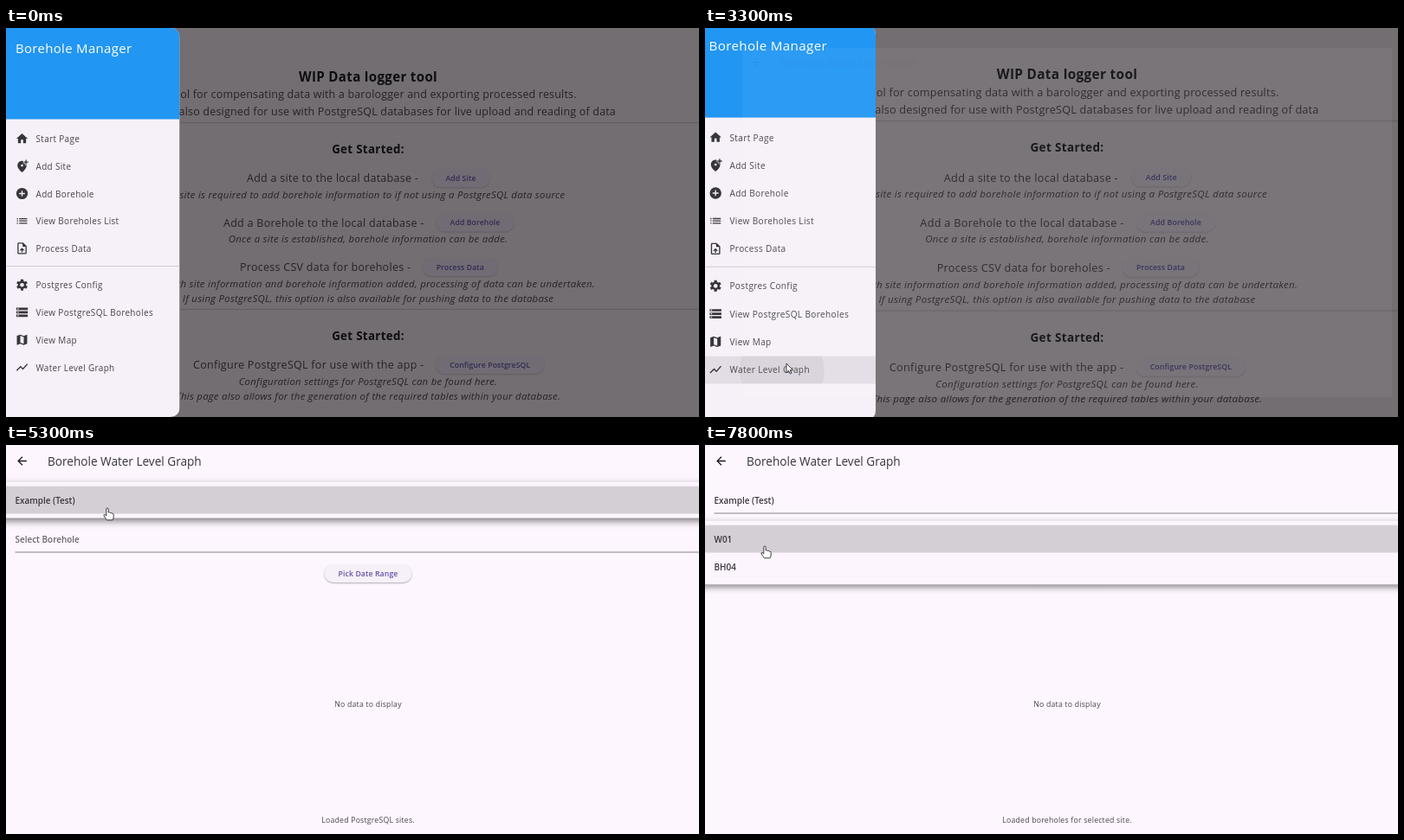
Animation, 800 px wide and 450 px high, one loop 8 s. Source, as an HTML page with a canvas:

```html
<!DOCTYPE html>
<html lang="en">
<head>
<meta charset="utf-8">
<title>Borehole Manager</title>
<style>
html, body { margin: 0; width: 100%; height: 100%; overflow: hidden; }
canvas { display: block; }
</style>
</head>
<body>
<canvas id="stage" width="800" height="450"></canvas>
<script>
const ctx = document.getElementById('stage').getContext('2d');
const LOOP = 8000, STEP = 100;
const PAGE_W = 836, CX = 418, CY = 225, DRAWER_W = 200.5, DP = 0.6614;
const FONT = '"Open Sans", "Noto Sans", sans-serif';
const SURFACE = '#fdf6fe', INK = '#38353b', PURPLE = '#6750a4';

// Text styles: font prefix, size, letter spacing
const TITLE = ['', 13.6, 0];
const HEADER = ['', 14.95, 0.33];
const ITEM = ['', 9.93, 0.35];
const FIELD = ['600 ', 9.93, 0];
const BODY = ['', 8.7, 0.23];
const BUTTON = ['600 ', 8.7, 0.1];
const HEADLINE = ['bold ', 15.1, 0.33];
const SUBHEAD = ['bold ', 13.3, 0.33];
const INTRO = ['', 12.5, 0.18];
const ROW = ['', 12.5, 0.27];
const NOTE = ['italic ', 11.35, 0.3];

const ICONS = {
  back: 'M20 11H7.83l5.59-5.59L12 4l-8 8 8 8 1.41-1.41L7.83 13H20v-2z',
  home: 'M10 20v-6h4v6h5v-8h3L12 3 2 12h3v8z',
  pin: 'M20 1v3h3v2h-3v3h-2V6h-3V4h3V1h2zm-8 12c1.1 0 2-.9 2-2s-.9-2-2-2-2 .9-2 2 .9 2 2 2zm2-9.75V7h3v3h2.92c.05.39.08.79.08 1.2 0 3.32-2.67 7.25-8 11.8-5.33-4.55-8-8.48-8-11.8C4 6.22 7.8 3 12 3c.68 0 1.35.08 2 .25z',
  add: 'M12 2a10 10 0 1 0 0 20 10 10 0 0 0 0-20zm5 11h-4v4h-2v-4H7v-2h4V7h2v4h4z',
  list: 'M3 7h2v2H3zm0 4h2v2H3zm0 4h2v2H3zM7 7h14v2H7zm0 4h14v2H7zm0 4h14v2H7z',
  file: 'M14 2H6q-2 0-2 2v16q0 2 2 2h12q2 0 2-2V8zm4 18H6V4h7v5h5zM8 15l1.4 1.4 1.6-1.6V19h2v-4.2l1.6 1.6L16 15l-4-4z',
  storage: 'M2 20h20v-4H2zm2-3h2v2H4zM2 4v4h20V4zm4 3H4V5h2zm-4 7h20v-4H2zm2-3h2v2H4z',
  map: 'M20.5 3L15 5.1 9 3 3 5v16l6-2.1 6 2.1 6-2V3zM15 19l-6-2.1V5l6 2.1z',
  chart: 'M3.5 18.5l6-6 4 4L22 6.9l-1.4-1.4-7.1 8-4-4L2 17z'
};
for (const name in ICONS) ICONS[name] = new Path2D(ICONS[name]);

const ARROW = new Path2D('M0 0V10.6L2.5 8.4 4.2 12 5.8 11.3 4.2 7.8H7.5z');
const HAND = new Path2D('M-1.2 1.2a1.2 1.2 0 0 1 2.4 0V5q1.6-.6 2 .5 1.5-.5 2 .6 1.9-.3 2 1.2V10q0 2-1.2 3.8H-.6Q-2 12-4 8.8q-.3-1.6 1.2-1.3L-1.2 9z');

const MENU = [
  ['home', 'Start Page', 128.5], ['pin', 'Add Site', 160.2], ['add', 'Add Borehole', 192],
  ['list', 'View Boreholes List', 223.7], ['file', 'Process Data', 255.4],
  ['gear', 'Postgres Config', 297.7], ['storage', 'View PostgreSQL Boreholes', 329.4],
  ['map', 'View Map', 361.2], ['chart', 'Water Level Graph', 393]
];

// Pointer path: time, x, y
const PATH = [
  [1800, 528, -5], [1900, 562, 25], [2000, 589, 80], [2100, 583, 150], [2200, 535, 220],
  [2300, 440, 282], [2400, 325, 332], [2500, 225, 364], [2600, 147, 379], [2700, 94, 388],
  [3600, 94, 388], [3900, 112, 320], [4100, 150, 220], [4400, 180, 120], [4600, 176, 68],
  [4900, 176, 68], [5300, 117, 73], [5400, 103, 67], [5700, 103, 67], [6000, 83, 100],
  [6300, 72, 113], [6500, 69, 117]
];

const ramp = (t, from, to) => Math.min(1, Math.max(0, (t - from) / (to - from)));

function pointerAt(t) {
  const next = PATH.findIndex(p => p[0] > t);
  if (next < 0) return PATH[PATH.length - 1].slice(1);
  const [a, b] = [PATH[next - 1], PATH[next]], k = ramp(t, a[0], b[0]);
  return [a[1] + (b[1] - a[1]) * k, a[2] + (b[2] - a[2]) * k];
}

// cubic-bezier(.4, 0, .2, 1)
function fastOutSlowIn(x) {
  let lo = 0, hi = 1;
  for (let i = 0; i < 20; i++) {
    const u = (lo + hi) / 2, v = 1 - u;
    if (1.2 * v * v * u + 0.6 * v * u * u + u * u * u < x) lo = u; else hi = u;
  }
  return lo * lo * (3 - 2 * lo);
}

function rect(x, y, w, h, color) {
  ctx.fillStyle = color;
  ctx.fillRect(x, y, w, h);
}

// y is the middle of the capitals
function text(str, x, y, [prefix, size, spacing], color, align = 'left') {
  ctx.font = `${prefix}${size}px ${FONT}`;
  ctx.letterSpacing = spacing + 'px';
  ctx.textAlign = align;
  ctx.fillStyle = color;
  ctx.fillText(str, x, y + size * 0.357);
}

function zoomed(scale, draw) {
  ctx.save();
  ctx.translate(CX, CY);
  ctx.scale(scale, scale);
  ctx.translate(-CX, -CY);
  draw();
  ctx.restore();
}

function gear() {
  ctx.lineWidth = 3.8;
  ctx.beginPath();
  ctx.arc(0, 0, 5.4, 0, 2 * Math.PI);
  ctx.stroke();
  ctx.lineWidth = 4.6;
  for (let i = 0; i < 6; i++) {
    const a = Math.PI * (i / 3 + 1 / 6), c = Math.cos(a), s = Math.sin(a);
    ctx.beginPath();
    ctx.moveTo(6 * c, 6 * s);
    ctx.lineTo(9.8 * c, 9.8 * s);
    ctx.stroke();
  }
}

function icon(name, x, y, color) {
  ctx.save();
  ctx.translate(x, y);
  ctx.scale(DP, DP);
  ctx.fillStyle = ctx.strokeStyle = color;
  if (name === 'gear') gear();
  else {
    ctx.translate(-12, -12);
    ctx.fill(ICONS[name], 'evenodd');
  }
  ctx.restore();
}

function pill(label, x, y, fill, color, shadow) {
  ctx.font = `${BUTTON[0]}${BUTTON[1]}px ${FONT}`;
  ctx.letterSpacing = BUTTON[2] + 'px';
  const w = ctx.measureText(label).width + 32;
  ctx.save();
  ctx.shadowColor = shadow;
  ctx.shadowBlur = 2;
  ctx.shadowOffsetY = 1;
  ctx.fillStyle = fill;
  ctx.beginPath();
  ctx.roundRect(x - w / 2, y - 10.5, w, 21, 10.5);
  ctx.fill();
  ctx.restore();
  text(label, x, y, BUTTON, color, 'center');
}

function home() {
  const strong = '#0e0d0f', ink = '#252226';
  const centered = (str, y, style, color = ink) => text(str, CX, y, style, color, 'center');
  const action = (str, x, y, label, buttonX) => {
    text(str, x, y, ROW, ink);
    pill(label, buttonX, y - 0.5, '#716c73', '#322a54', 'rgba(0,0,0,.16)');
  };
  rect(-50, -50, 950, 550, '#736e72');
  centered('WIP Data logger tool', 56.5, HEADLINE, strong);
  centered('A tool for compensating data with a barologger and exporting processed results.', 77, INTRO);
  centered('This tool is also designed for use with PostgreSQL databases for live upload and reading of data', 96.5, INTRO);
  rect(0, 109, PAGE_W, 1, '#615c61');
  centered('Get Started:', 140, SUBHEAD, strong);
  action('Add a site to the local database -', 278, 174, 'Add Site', 525);
  centered('A site is required to add borehole information to if not using a PostgreSQL data source', 192.5, NOTE);
  action('Add a Borehole to the local database -', 251, 225.5, 'Add Borehole', 541.5);
  centered('Once a site is established, borehole information can be adde.', 244, NOTE);
  action('Process CSV data for boreholes -', 270, 277, 'Process Data', 524.3);
  centered('Once with site information and borehole information added, processing of data can be undertaken.', 295.5, NOTE);
  centered('If using PostgreSQL, this option is also available for pushing data to the database', 312.5, NOTE);
  rect(0, 325, PAGE_W, 1, '#615c61');
  centered('Get Started:', 356, SUBHEAD, strong);
  action('Configure PostgreSQL for use with the app -', 216, 390, 'Configure PostgreSQL', 558.7);
  centered('Configuration settings for PostgreSQL can be found here.', 408.5, NOTE);
  centered('This page also allows for the generation of the required tables within your database.', 426, NOTE);
}

function drawer(t) {
  ctx.save();
  ctx.beginPath();
  ctx.roundRect(0, 0, DRAWER_W, 450, [0, 10.6, 10.6, 0]);
  ctx.clip();
  rect(0, 0, DRAWER_W, 450, '#f6f0f8');
  rect(0, 0, DRAWER_W, 105.5, '#2196f3');
  text('Borehole Manager', 11, 24, HEADER, '#fff');
  rect(0, 275, DRAWER_W, 1, '#d3cdd6');
  if (t >= 2700) {
    ctx.beginPath();
    ctx.rect(0, 377, DRAWER_W, 31.5);
    ctx.clip();
    rect(0, 377, DRAWER_W, 32, `rgba(29,27,32,${t < 3000 ? 0.06 : 0.09})`);
    ctx.fillStyle = 'rgba(29,27,32,.05)';
    ctx.beginPath();
    ctx.arc(94, 393, 48 * ramp(t, 3000, 3300), 0, 2 * Math.PI);
    ctx.fill();
  }
  ctx.restore();
  for (const [name, label, y] of MENU) {
    icon(name, 18.5, y - 0.5, '#38353b');
    text(label, 34.5, y, ITEM, '#474449');
  }
}

function spinner(elapsed) {
  const cycle = elapsed / 1333 % 1;
  const head = fastOutSlowIn(ramp(cycle, 0, 0.5)), tail = fastOutSlowIn(ramp(cycle, 0.5, 1));
  const start = Math.PI * (-0.5 + tail * 1.5 + elapsed / 2222 * 2 + cycle * 0.5);
  ctx.save();
  ctx.lineCap = 'square';
  ctx.strokeStyle = PURPLE;
  ctx.lineWidth = 2.6;
  ctx.beginPath();
  ctx.arc(CX, 244, 12.1, start, start + Math.max((head - tail) * 1.5 * Math.PI, 0.02));
  ctx.stroke();
  ctx.restore();
}

function field(label, y, hovered, color) {
  if (hovered) rect(10.5, y - 16.5, PAGE_W - 21, 31.5, '#f1ebf3');
  text(label, 10.5, y, FIELD, color);
  rect(10.5, y + 14, PAGE_W - 21, 1, '#858188');
}

// Dropdown list whose first entry is focused; y is the middle of that entry
function dropdown(items, y, open, alpha) {
  if (!open || !alpha) return;
  const row = 31.8, top = y - 16.8;
  const height = row + 10 + (items.length - 1) * row * ramp(open, 0.25, 0.6);
  ctx.save();
  ctx.globalAlpha = alpha * ramp(open, 0, 0.3);
  ctx.save();
  ctx.shadowColor = 'rgba(0,0,0,.5)';
  ctx.shadowBlur = 8;
  ctx.shadowOffsetY = 3;
  rect(-20, top - 5, 880, height, '#fcf5fd');
  ctx.restore();
  ctx.beginPath();
  ctx.rect(0, top - 5, PAGE_W, height);
  ctx.clip();
  ctx.globalAlpha = alpha * ramp(open, 0.4, 1);
  rect(0, top, PAGE_W, row, '#d4ced5');
  items.forEach((label, i) => text(label, 10.5, y + i * row, FIELD, INK));
  ctx.restore();
}

function graphPage(t, loaded, [, py]) {
  const chosen = t >= 5720;
  rect(0, 0, PAGE_W, 450, SURFACE);
  icon('back', 18.5, 18.5, '#1d1b20');
  text('Borehole Water Level Graph', 48, 19.5, TITLE, '#38353b');
  if (loaded) {
    const over = y => py >= y - 16.5 && py < y + 15;
    field(chosen ? 'Example (Test)' : 'Select Site', 64.5, over(64.5), chosen ? INK : '#69656d');
    field('Select Borehole', 109.5, over(109.5), '#69656d');
    pill('Pick Date Range', CX, 148.5, '#f6f0f9', PURPLE, 'rgba(0,0,0,.3)');
    text('No data to display', CX, 300, BODY, '#4a474e', 'center');
    text(chosen ? 'Loaded boreholes for selected site.' : 'Loaded PostgreSQL sites.', CX, 434, BODY, '#4a474e', 'center');
  } else if (t >= 3395) spinner(t - (chosen ? 5720 : 3395));
  dropdown(['Example (Test)'], 64.5, ramp(t, 4900, 5200), 1 - ramp(t, 5700, 5900));
  dropdown(['W01', 'BH04'], 109.5, ramp(t, 6900, 7300), 1);
}

function pointer([x, y], hand) {
  ctx.save();
  ctx.translate(x, y);
  ctx.lineWidth = 0.9;
  ctx.lineJoin = 'round';
  ctx.fillStyle = '#fff';
  ctx.strokeStyle = '#2b2b2b';
  const shape = hand ? HAND : ARROW;
  ctx.fill(shape);
  ctx.stroke(shape);
  ctx.restore();
}

function draw(t) {
  const zoom = t > 3281 ? 1 - Math.exp(-(t - 3281) / 50) : 0;
  const loaded = t >= 4000 && (t < 5720 || t >= 6300);
  const at = t >= 1800 ? pointerAt(t) : null;
  if (t < 3700) {
    zoomed(1 + 0.05 * zoom, () => { home(); drawer(t); });
    rect(0, 0, 800, 450, `rgba(0,0,0,${0.6 * ramp(t, 3300, 3360)})`);
  }
  if (zoom) {
    ctx.globalAlpha = ramp(t, 3295, 3395);
    zoomed(t < 3700 ? 0.85 + 0.15 * zoom : 1, () => graphPage(t, loaded, at));
    ctx.globalAlpha = 1;
  }
  if (at) {
    const [, y] = at;
    pointer(at, loaded && (y >= 48 && y < 80 || y >= 93 && y < 125));
  }
}

function frame(now) {
  const t = now % LOOP;
  draw(t - t % STEP);
  requestAnimationFrame(frame);
}

requestAnimationFrame(frame);
</script>
</body>
</html>
```
